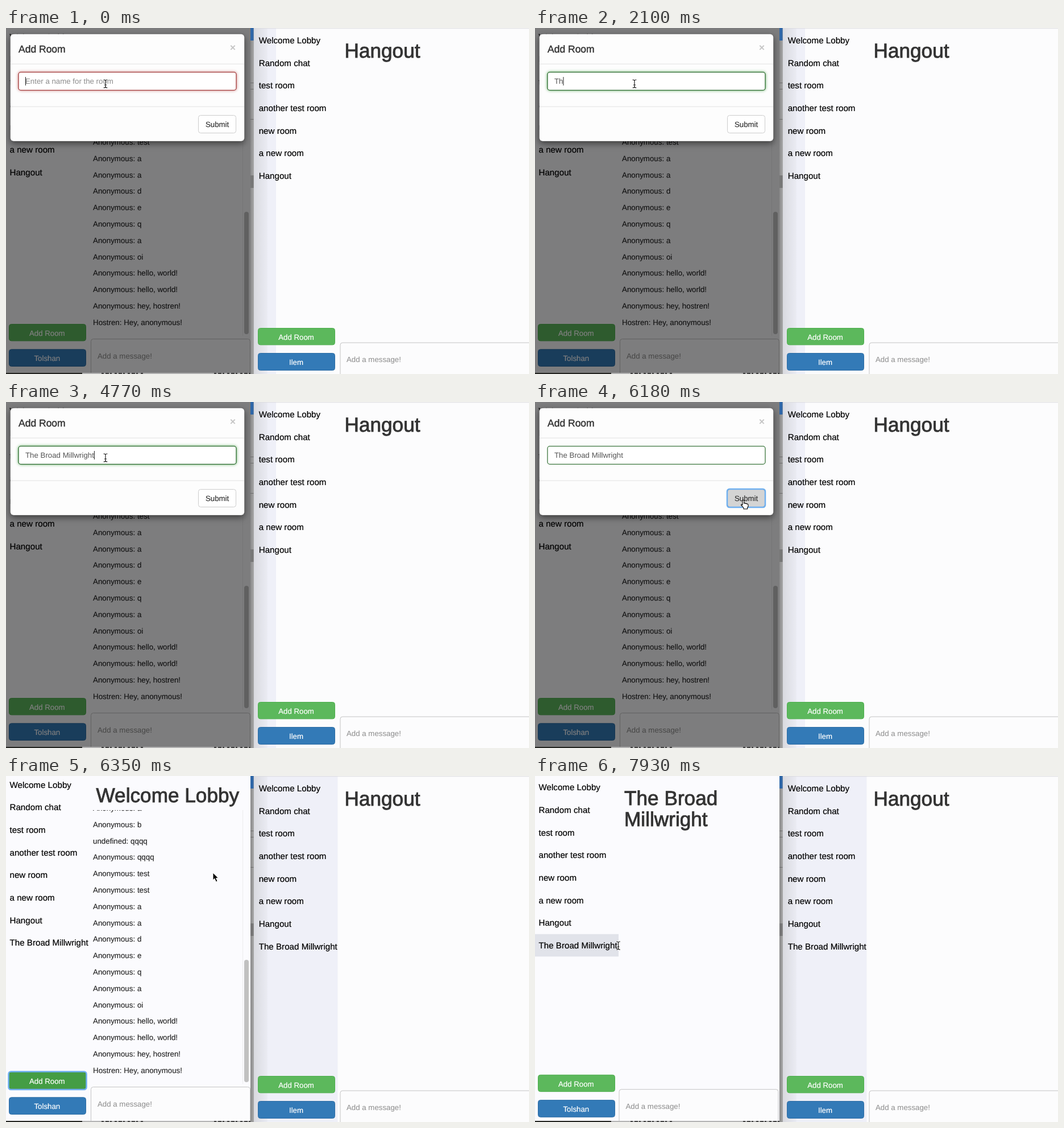
Animation, 920 px wide and 608 px high, one loop 8000 ms. Source, as an HTML page:

```html
<!DOCTYPE html>
<html lang="en">
<head>
<meta charset="utf-8">
<title>Chat rooms</title>
<style>
  html, body { margin: 0; width: 100%; height: 100%; overflow: hidden; background: #fcfcfd; }
  svg { display: block; width: 920px; height: 608px; }
  text {
    font-family: "Liberation Sans", Arial, sans-serif; font-size: 13.27px; fill: #555;
    white-space: pre; text-rendering: geometricPrecision;
  }
  .room { font-size: 15.17px; fill: #000; stroke: #000; stroke-width: .2px; }
  .msg { font-size: 13.35px; fill: #262626; stroke: #262626; stroke-width: .15px; }
  .head { font-size: 35.2px; fill: #333; stroke: #333; stroke-width: .9px; }
  .title { font-size: 17.5px; fill: #333; stroke: #333; stroke-width: .45px; }
  .label { fill: #333; stroke: #333; stroke-width: .2px; text-anchor: middle; }
  .hint { fill: #8c8c8c; }
  .btn { fill: #fff; stroke: #fff; stroke-width: .2px; text-anchor: middle; }
  .green { fill: #5cb85c; stroke: #4cae4c; }
  .green.focus { fill: #449d44; stroke: #398439; }
  .blue { fill: #337ab7; stroke: #2e6da4; }
  .ring { fill: none; stroke: #6fb0f0; stroke-width: 2.5px; }
  .box { fill: #fcfcfd; stroke: #c4c4c4; }
  .field { fill: #fff; stroke: #3c763d; stroke-width: 1.3px; }
  .field.focus { stroke: #2b6a2e; filter: drop-shadow(0 0 2.5px #67b168); }
  .field.error { stroke: #a33b3b; filter: drop-shadow(0 0 2.5px #ce8483); }
  .submit { fill: #fff; stroke: #ccc; }
  .submit.hover { fill: #e6e6e6; stroke: #adadad; }
  .submit.press { fill: #d4d4d4; stroke: #8c8c8c; }
  .panel { fill: #fdfdfd; stroke: rgba(0,0,0,.25); filter: drop-shadow(0 4px 6px rgba(0,0,0,.5)); }
</style>
</head>
<body>
<svg viewBox="0 0 920 608">
  <defs>
    <linearGradient id="shade">
      <stop offset="0" stop-color="#110" stop-opacity=".1"/>
      <stop offset="1" stop-color="#110" stop-opacity=".02"/>
    </linearGradient>
    <linearGradient id="gap">
      <stop offset="0" stop-color="#8a8a8a"/>
      <stop offset="1" stop-color="#a8a8a8"/>
    </linearGradient>
    <clipPath id="window"><path d="M0 0H430V606H0Z"/></clipPath>
    <clipPath id="scroll"><path d="M148 60H430V545H148Z"/></clipPath>
  </defs>

  <!-- right window -->
  <rect width="920" height="608" fill="#fcfcfd"/>
  <rect id="sidebar" x="436" width="39" height="608" fill="#eff0f8"/>
  <rect x="436" width="24" height="608" fill="url(#shade)"/>
  <path d="M436 .8H920" stroke="#dcdcdf"/>
  <g id="rightRooms"></g>
  <text class="head" x="595.5" y="52">Hangout</text>
  <rect class="green" x="443.5" y="527.5" width="135" height="29.3" rx="4"/>
  <text class="btn" x="510.5" y="547.7">Add Room</text>
  <rect class="blue" x="443.5" y="571.5" width="135" height="30" rx="4"/>
  <text class="btn" x="510.5" y="592">Ilem</text>
  <rect class="box" x="588" y="553" width="345" height="70" rx="4"/>
  <text class="hint" x="599" y="587">Add a message!</text>

  <!-- strip between the windows -->
  <rect x="430" width="6" height="608" fill="url(#gap)"/>
  <rect x="430" width="5.5" height="22" fill="#2f67a8"/>
  <rect x="430" y="259" width="5.5" height="22" fill="#777"/>
  <path d="M430 96.5h5.5M430 107.5h5.5M430 160.5h5.5" stroke="#6c6c6c"/>

  <!-- left window -->
  <rect y="605" width="134" height="3" fill="#252622"/>
  <rect x="134" y="605" width="296" height="3" fill="#b4b4b4"/>
  <path d="M168 607H242M366 607H432" stroke="#444" stroke-width="2" stroke-dasharray="4 3 6 2 3 5"/>
  <g clip-path="url(#window)">
    <rect width="430" height="606" fill="#fbfbfe"/>
    <g id="page">
      <rect id="hover" y="273" width="147" height="39.5" fill="#e1e3ea"/>
      <g id="leftRooms"></g>
      <rect id="add" class="green" x="5.5" y="520.5" width="135" height="29.3" rx="4"/>
      <rect id="addRing" class="ring" x="4.5" y="519.5" width="137" height="31.5" rx="4"/>
      <text class="btn" x="72.3" y="541">Add Room</text>
      <rect class="blue" x="5.5" y="564.8" width="135" height="29.7" rx="4"/>
      <text class="btn" x="72.3" y="585.3">Tolshan</text>
    </g>
    <g id="lobby">
      <text class="head" x="158.5" y="45.5">Welcome Lobby</text>
      <g id="messages" clip-path="url(#scroll)"></g>
      <path d="M416.5 60V541" stroke="#ececee"/>
      <rect x="419" y="323" width="8" height="215" rx="4" fill="#c1c1c1"/>
    </g>
    <g id="newRoom">
      <text class="head" x="157" y="50.5">The Broad</text>
      <text class="head" x="157" y="87.5">Millwright</text>
    </g>
    <g id="compose">
      <rect class="box" x="149.5" y="546.5" width="280" height="80" rx="4"/>
      <text class="hint" x="161" y="581">Add a message!</text>
    </g>
    <rect id="backdrop" width="430" height="606"/>
  </g>

  <!-- dialog -->
  <g id="modal">
    <rect class="panel" x="7.5" y="10.5" width="412" height="188.5" rx="6"/>
    <path d="M8 63.2H419M8 138.2H419" stroke="#e3e3e3"/>
    <text class="title" x="22" y="42.5">Add Room</text>
    <path d="M395.3 30.7l7.4 7.4m0-7.4l-7.4 7.4" stroke="#c6c6c6" stroke-width="2"/>
    <rect id="field" x="22" y="77.7" width="383" height="31.6" rx="4"/>
    <text id="hint" class="hint" x="34" y="98">Enter a name for the room</text>
    <text id="typed" x="34" y="98"></text>
    <rect id="caret" y="86" width="1" height="15" fill="#222"/>
    <rect id="submit" x="338.5" y="153.5" width="66" height="31" rx="4"/>
    <rect id="submitRing" class="ring" x="338" y="153" width="67" height="32" rx="4"/>
    <text class="label" x="371.6" y="173.8">Submit</text>
  </g>

  <g id="cursor">
    <g id="beam" fill="none" stroke-linecap="round">
      <path d="M-3-7Q0-7 0-5Q0-7 3-7M0-5V5M-3 7Q0 7 0 5Q0 7 3 7M-1.5 2H1.5" stroke="#fff" stroke-width="2.4"/>
      <path d="M-3-7Q0-7 0-5Q0-7 3-7M0-5V5M-3 7Q0 7 0 5Q0 7 3 7M-1.5 2H1.5" stroke="#111" stroke-width="1.1"/>
    </g>
    <path id="arrow" d="M0 0V13L3 10.2L5.4 16L8 15L5.6 9.4H9.6Z" fill="#000" stroke="#fff"/>
    <path id="hand" d="M0 1.2Q1.5-.6 2.8 1.2V6Q4.5 5 5.5 6.6Q7.2 5.8 8 7.2Q9.8 6.8 10 8.8V11.5L8.6 14V16H2V14L-2.4 9.2Q-2.6 7.2 0 8.8Z"
      fill="#fff" stroke="#000" stroke-width="1.1"/>
  </g>
</svg>

<script>
const LOOP = 8000;
const NAME = "The Broad Millwright";
const PRESS = 6180, FADE = 6270, CLOSED = 6350, PICK = 7660, ENTER = 7750;
const $ = id => document.getElementById(id);
const show = (id, on) => $(id).setAttribute("visibility", on ? "inherit" : "hidden");
const move = (id, x, y) => $(id).setAttribute("transform", `translate(${x} ${y})`);
const style = (id, cls) => $(id).setAttribute("class", cls);

const rooms = ["Welcome Lobby", "Random chat", "test room", "another test room",
  "new room", "a new room", "Hangout", NAME];
const lines = ["Anonymous: a", "Anonymous: b", "undefined: qqqq", "Anonymous: qqqq",
  ...["test", "test", "a", "a", "d", "e", "q", "a", "oi", "hello, world!",
    "hello, world!", "hey, hostren!"].map(s => "Anonymous: " + s),
  "Hostren: Hey, anonymous!"];

function column(id, items, cls, x, y, step) {
  $(id).innerHTML = items.map((s, i) =>
    `<text class="${cls}" x="${x}" y="${(y + i * step).toFixed(1)}">${s}</text>`).join("");
}
column("leftRooms", rooms, "room", 6.5, 20.5, 39.68);
column("rightRooms", rooms, "room", 444.7, 27, 39.68);
column("messages", lines, "msg", 153, 61, 28.8);
const added = ["leftRooms", "rightRooms"].map(id => $(id).lastChild);

// Time of each key press; "Br" arrives in one step.
const keys = [2020, 2100, 2280, 2370, 2550, 2550, 2730, 2820, 2900, 2990,
  3260, 3350, 3710, 3790, 3970, 4320, 4410, 4590, 4680, 4770];
const caretOff = [[260, 680], [1220, 1750], [5300, 5830], [PRESS, LOOP]];

// time, x, y, shape
const path = [
  [0, 175, 98, "beam"], [5390, 190, 105, "beam"], [5480, 225, 120, "arrow"],
  [5570, 270, 140, "arrow"], [5650, 313, 157, "arrow"], [5740, 343, 168, "hand"],
  [5830, 358, 174, "hand"], [5920, 366, 176, "hand"], [6000, 365, 172, "hand"],
  [FADE, 364, 170, "arrow"],
  [6830, 380, 168, "arrow"], [6920, 393, 168, "arrow"], [7010, 360, 190, "arrow"],
  [7110, 290, 230, "arrow"], [7200, 220, 262, "arrow"], [7290, 172, 284, "beam"],
  [7390, 150, 292, "beam"], [7480, 146, 294, "beam"], [ENTER, 146.5, 298, "beam"]];

function draw(t) {
  const count = keys.filter(k => k <= t).length;
  const open = t < CLOSED, fading = open && t >= FADE;
  const entered = t >= ENTER;

  // dialog
  show("modal", open);
  $("modal").setAttribute("opacity", fading ? .62 : 1);
  move("modal", 0, fading ? -14.8 : 0);
  $("backdrop").setAttribute("opacity", fading ? .33 : open ? .5 : 0);
  style("field", "field" + (t >= PRESS ? "" : count ? " focus" : " error"));
  $("typed").textContent = NAME.slice(0, count);
  show("hint", !count);
  show("caret", !caretOff.some(([a, b]) => t >= a && t < b));
  $("caret").setAttribute("x", 34 + (count ? $("typed").getComputedTextLength() : 0));
  style("submit", "submit" + (t >= PRESS && t < FADE ? " press" : t >= 5740 ? " hover" : ""));
  show("submitRing", t >= PRESS && open);

  // rooms
  added.forEach(el => el.setAttribute("visibility", t >= FADE ? "inherit" : "hidden"));
  $("sidebar").setAttribute("width", t >= FADE ? 147.5 : 39);
  show("hover", t >= 7290);
  show("lobby", !entered);
  show("newRoom", entered);
  move("page", 0, entered ? 4.8 : 0);
  move("compose", entered ? -1.5 : 0, entered ? 4.2 : 0);
  const focus = t >= CLOSED && t < PICK;
  style("add", focus ? "green focus" : "green");
  show("addRing", focus);

  // pointer
  const [, x, y, shape] = path.filter(p => p[0] <= t).pop();
  move("cursor", x, y);
  for (const id of ["beam", "arrow", "hand"]) show(id, id === shape);
}

function tick() {
  draw(performance.now() % LOOP);
  requestAnimationFrame(tick);
}
tick();
</script>
</body>
</html>
```
